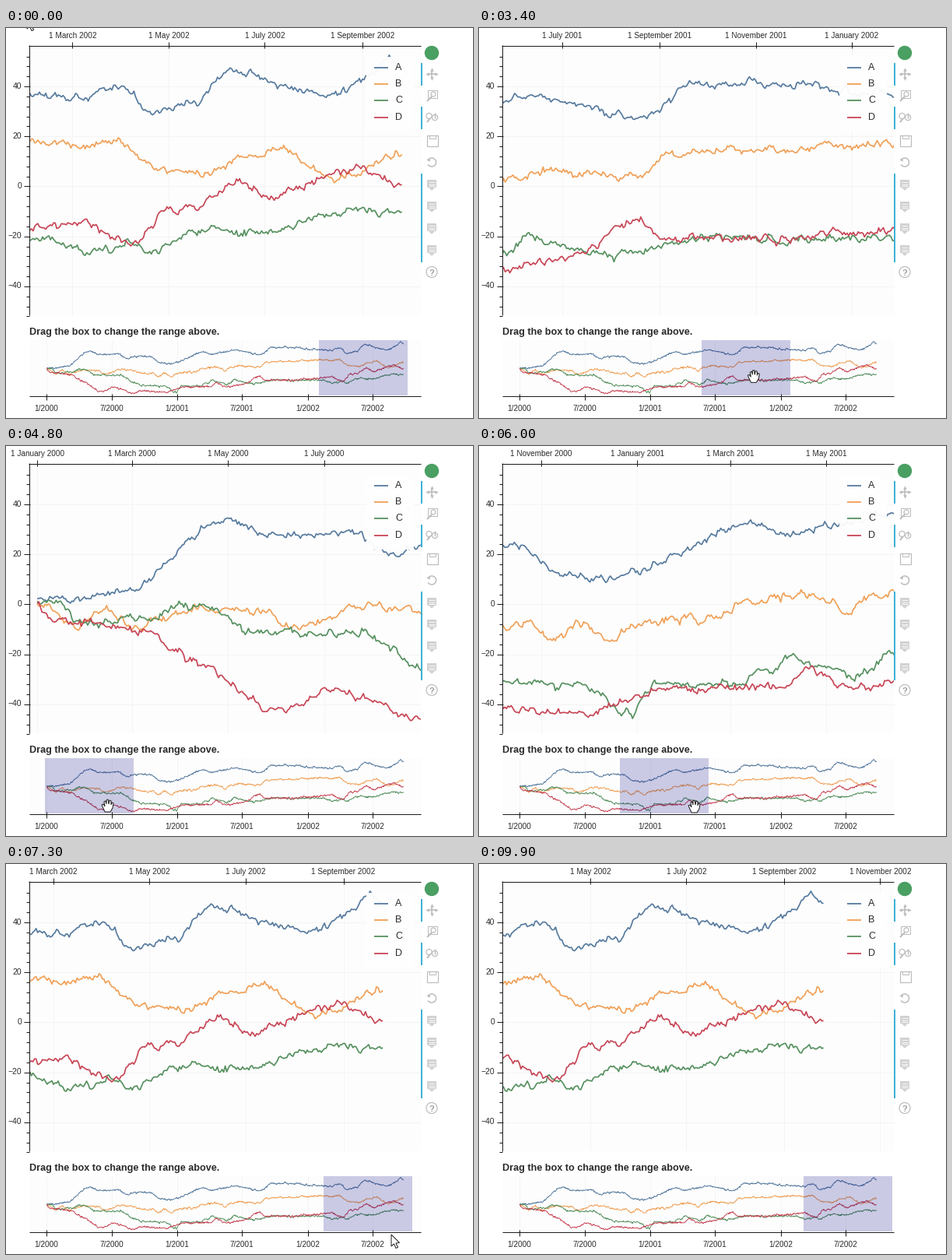
These frames come from a looping animation (600 px wide and 501 px high, 10000 ms). A matplotlib script:

```python
import numpy as np
import matplotlib.pyplot as plt
from matplotlib.animation import FuncAnimation
from matplotlib.patches import Arc, Circle, Polygon, Rectangle

W, H, DPI = 600, 501, 100
FRAMES, STEP = 100, 100
PT = 72 / DPI                       # points per pixel

LEFT, RIGHT, TOP, BOTTOM = 30, 533, 23, 369
DAY_PX, UNIT_PX, ZERO_Y = 2.0246, 3.21, 202.5
NAV_TOP, NAV_BOTTOM, NAV_X0, NAV_DAY = 401, 472, 52.3, 0.459
SPAN = (RIGHT - LEFT) / DAY_PX
INK, GREY, GRID = "#1c1c1c", "#bcbcbc", "#f4f4f4"

# Main turning points of each series as (day, value).
SERIES = {
    "A": ("#567a9e", [
        (0, 2), (62, 5), (85, 18), (103, 30), (125, 35), (140, 28), (200, 28), (228, 20),
        (250, 25), (292, 23), (312, 13), (345, 9), (375, 15), (437, 34), (456, 28),
        (533, 37), (596, 26), (627, 40), (680, 41), (763, 36), (800, 36), (822, 41),
        (835, 31), (850, 31), (870, 33), (890, 47), (915, 41), (958, 35), (991, 51),
        (999, 47)]),
    "B": ("#f0a057", [
        (0, 0), (25, -8), (45, -2), (60, -10), (90, -3), (140, -2), (160, -10), (210, 0),
        (245, -4), (285, -11), (295, -7), (312, -15), (328, -8), (346, -14), (370, -7),
        (415, -6), (435, 1), (478, 4), (500, -4), (515, 2), (540, 6), (595, 3), (612, 13),
        (680, 15), (763, 17), (820, 17), (850, 5), (878, 4), (890, 10), (925, 14),
        (957, 2), (999, 13)]),
    "C": ("#55905e", [
        (0, 1), (14, 2), (25, -8), (50, -7), (75, -5), (90, -1), (112, -2), (135, -12),
        (208, -11), (235, -23), (262, -31), (330, -32), (361, -45), (377, -32),
        (432, -32), (466, -21), (504, -30), (526, -20), (575, -29), (632, -21),
        (680, -22), (763, -20), (800, -27), (830, -22), (840, -27), (872, -17),
        (905, -19), (935, -16), (950, -11), (999, -9)]),
    "D": ("#c74555", [
        (0, 0), (8, -6), (50, -9), (75, -13), (90, -21), (108, -25), (135, -38),
        (145, -43), (165, -42), (184, -34), (240, -46), (265, -41), (335, -44),
        (385, -34), (460, -33), (477, -26), (502, -34), (545, -29), (570, -24),
        (582, -16), (595, -14), (608, -20), (680, -22), (763, -17), (797, -14),
        (815, -21), (832, -23), (850, -9), (870, -9), (895, 2), (915, -5), (970, 8),
        (999, -1)]),
}

# (time in ms, first visible day) and (time in ms, pointer x, pointer y)
RANGE = np.array([(0, 762.6), (2600, 762.6), (3800, 382.5), (4100, 382.5), (4600, -5),
                  (4900, -5), (6000, 280.4), (7300, 774.7), (7500, 795.2)]).T
POINTER = np.array([(0, 27, -14), (1800, 519, 427), (2300, 519, 427), (2600, 477, 440),
                    (3800, 290, 451), (4100, 290, 451), (4600, 130, 462),
                    (4900, 130, 462), (6000, 276, 463), (7100, 478, 468),
                    (7300, 495, 476), (7800, 508, 512)]).T

days = np.arange(1000)
rng = np.random.default_rng(7)


def series_values(points):
    """Line through the turning points with day-to-day jitter on top."""
    jitter = np.zeros(days.size)
    for i, shock in enumerate(rng.normal(0, .75, days.size - 1)):
        jitter[i + 1] = .65 * jitter[i] + shock
    return np.interp(days, *zip(*points)) + jitter


fig = plt.figure(figsize=(W / DPI, H / DPI), dpi=DPI, facecolor="white")
ax = fig.add_axes([0, 0, 1, 1])
ax.set(xlim=(0, W), ylim=(H, 0))
ax.axis("off")


def line(xs, ys, color=INK, px=1.0, z=2, clip=None):
    art, = ax.plot(xs, ys, color=color, lw=px * PT, zorder=z, solid_capstyle="butt")
    if clip is not None:
        art.set_clip_path(clip)
    return art


def box(x0, y0, x1, y1, fill="none", edge="none", px=1.0, z=1, **kw):
    return ax.add_patch(Rectangle((x0, y0), x1 - x0, y1 - y0, facecolor=fill,
                                  edgecolor=edge, lw=px * PT, zorder=z, **kw))


def ring(x, y, r):
    ax.add_patch(Circle((x, y), r, facecolor="none", edgecolor=GREY, lw=1.2 * PT, zorder=5))


def label(x, y, s, px=10.0, ha="center", va="baseline", color="#2a2a2a", **kw):
    return ax.text(x, y, s, fontsize=px * PT, ha=ha, va=va, color=color, zorder=6,
                   family="Liberation Sans", **kw)


# Panels and axes
main = box(LEFT, TOP, RIGHT, BOTTOM, "#fdfdfd", z=0)
nav = box(LEFT, NAV_TOP, RIGHT, NAV_BOTTOM, "#fdfdfd", z=0)
line([29, RIGHT], [TOP - .5] * 2, z=5)
line([29.5] * 2, [TOP - 1, BOTTOM], z=5)
line([LEFT, RIGHT], [NAV_BOTTOM + .5] * 2, z=5)

for v in range(-52, 56, 4):
    y = round(ZERO_Y - v * UNIT_PX) + .5
    if v % 20 == 0:
        line([LEFT, RIGHT], [y, y], GRID, z=1)
        line([23, 31], [y, y], z=5)
        label(20, y, str(v).replace("-", "\u2212"), 10.4, "right", "center")
    else:
        line([26, 30], [y, y], z=5)

months = np.arange("2000-01", "2003-01", 2, dtype="datetime64[M]")
month_days = (months.astype("datetime64[D]") - np.datetime64("2000-01-01")).astype(int)
NAMES = ["January", "March", "May", "July", "September", "November"]
ticks = []
for i, d in enumerate(month_days):
    year = 2000 + i // 6
    ticks.append((d, line([0, 0], [TOP, BOTTOM], GRID, z=1), line([0, 0], [18, 26], z=5),
                  label(0, 13, f"1 {NAMES[i % 6]} {year}")))
    if i % 3 == 0:
        x = round(NAV_X0 + d * NAV_DAY) - .5
        line([x, x], [NAV_TOP, NAV_BOTTOM], GRID, z=1)
        line([x, x], [470, 478], z=5)
        label(x, 491.5, f"{i % 6 * 2 + 1}/{year}")

label(30, 394, "Drag the box to change the range above.", 12.6, "left", weight="bold")

# Curves, selection and legend
curves = []
box(463, 37, 524, 133, "white", z=4, alpha=.95)
for row, (name, (color, points)) in enumerate(SERIES.items()):
    values = series_values(points)
    curves.append(line(days, ZERO_Y - values * UNIT_PX, color, 1.7, 3, main))
    line(NAV_X0 + days * NAV_DAY, 438 - values * .68, color, .95, 3, nav)
    y = 50.5 + 21.4 * row
    line([473, 491], [y, y], color, 1.8, 5)
    label(500, y, name, 12.5, "left", "center")
selection = box(0, NAV_TOP, SPAN * NAV_DAY, NAV_BOTTOM, "#000080", z=4, alpha=.2)

# Toolbar
for y0, y1 in [(45, 74), (101, 130), (187, 301)]:
    line([534, 534], [y0, y1], "#3fb1d6", 2, 5)
CX = 547
ax.add_patch(Circle((CX, 32), 8.5, color="#4a9f62", zorder=5))

line([CX - 5, CX + 5], [59, 59], GREY, 1.6, 5)
line([CX, CX], [54, 64], GREY, 1.6, 5)
for dx, dy, mark in [(-6, 0, "<"), (6, 0, ">"), (0, -6, "^"), (0, 6, "v")]:
    ax.plot(CX + dx, 59 + dy, mark, ms=4.5 * PT, mew=0, color=GREY, zorder=5)
box(542, 80, 554, 90, edge=GREY, z=5)
ring(549, 85, 3)
line([547, 541], [88, 94], GREY, 2, 5)
ring(543.5, 113, 3.6)
line([545, 541], [116, 121], GREY, 2, 5)
ring(551, 115, 3.6)
line([551, 551], [109, 116], GREY, 1.4, 5)
box(540.5, 137.5, 554.5, 151.5, edge=GREY, px=1.2, z=5)
box(543.5, 138, 551.5, 142, edge=GREY, z=5)
ax.add_patch(Arc((CX, 172.5), 11, 11, theta1=-140, theta2=150, color=GREY,
                 lw=1.5 * PT, zorder=5))
ax.plot(542, 169, "<", ms=4.5 * PT, mew=0, color=GREY, zorder=5)
for y in range(200, 285, 28):
    box(541, y - 5, 553, y + 5, "#d2d2d2", z=5)
    ax.add_patch(Polygon([(544, y + 5), (550, y + 5), (547, y + 8)], color="#d2d2d2", zorder=5))
    for dy in (-2.5, .5, 3):
        line([543, 551], [y + dy] * 2, "#f6f6f6", 1, 6)
ring(CX, 313.5, 7)
label(CX, 317.5, "?", 11, color="#a0a0a0", weight="bold")


# Pointers
def pointer(points, px=1.0):
    shape = ax.add_patch(Polygon(points, facecolor="white", edgecolor=INK,
                                 lw=px * PT, zorder=9, visible=False))
    return shape, np.array(points, float)


pointers = {
    "arrow": pointer([(0, 0), (0, 15), (3.5, 12), (6, 17.5), (8.5, 16.5), (6, 11), (10.5, 10.5)]),
    "resize": pointer([(-11, 0), (-6, -4), (-6, -1.2), (6, -1.2), (6, -4), (11, 0),
                       (6, 4), (6, 1.2), (-6, 1.2), (-6, 4)], .8),
    "hand": pointer([(-7, -1), (-5, -2), (-3, 1), (-4, -5), (-2, -6), (-1, -2), (-1, -7),
                     (1, -8), (2, -2), (3, -7), (5, -6), (5, -1), (6, -4), (8, -3),
                     (7, 3), (4, 8), (-3, 8)]),
}


def pointer_kind(t):
    if t < 1700 or t >= 7200:
        return "arrow"
    return "resize" if t < 2500 else "hand"


def draw(i):
    t = i * STEP
    start = np.interp(t, *RANGE)
    for curve in curves:
        curve.set_xdata(LEFT + (days - start) * DAY_PX)
    selection.set_x(NAV_X0 + start * NAV_DAY)

    for d, grid, tick, text in ticks:
        x = LEFT + (d - start) * DAY_PX
        for art in (grid, tick, text):
            art.set_visible(LEFT <= x <= RIGHT)
        grid.set_xdata([x, x])
        tick.set_xdata([x, x])
        text.set_x(x)

    spot = [np.interp(t, POINTER[0], row) for row in POINTER[1:]]
    for kind, (shape, points) in pointers.items():
        shape.set_visible(kind == pointer_kind(t))
        shape.set_xy(points + spot)
    return []


# Only the ticks that fall inside the lower panel belong there.
for art in list(ax.lines) + list(ax.texts):
    if art in ax.texts and art.get_text() == "":
        art.remove()

anim = FuncAnimation(fig, draw, frames=FRAMES, interval=STEP, repeat=True,
                     repeat_delay=0, blit=False)
plt.show()
```
